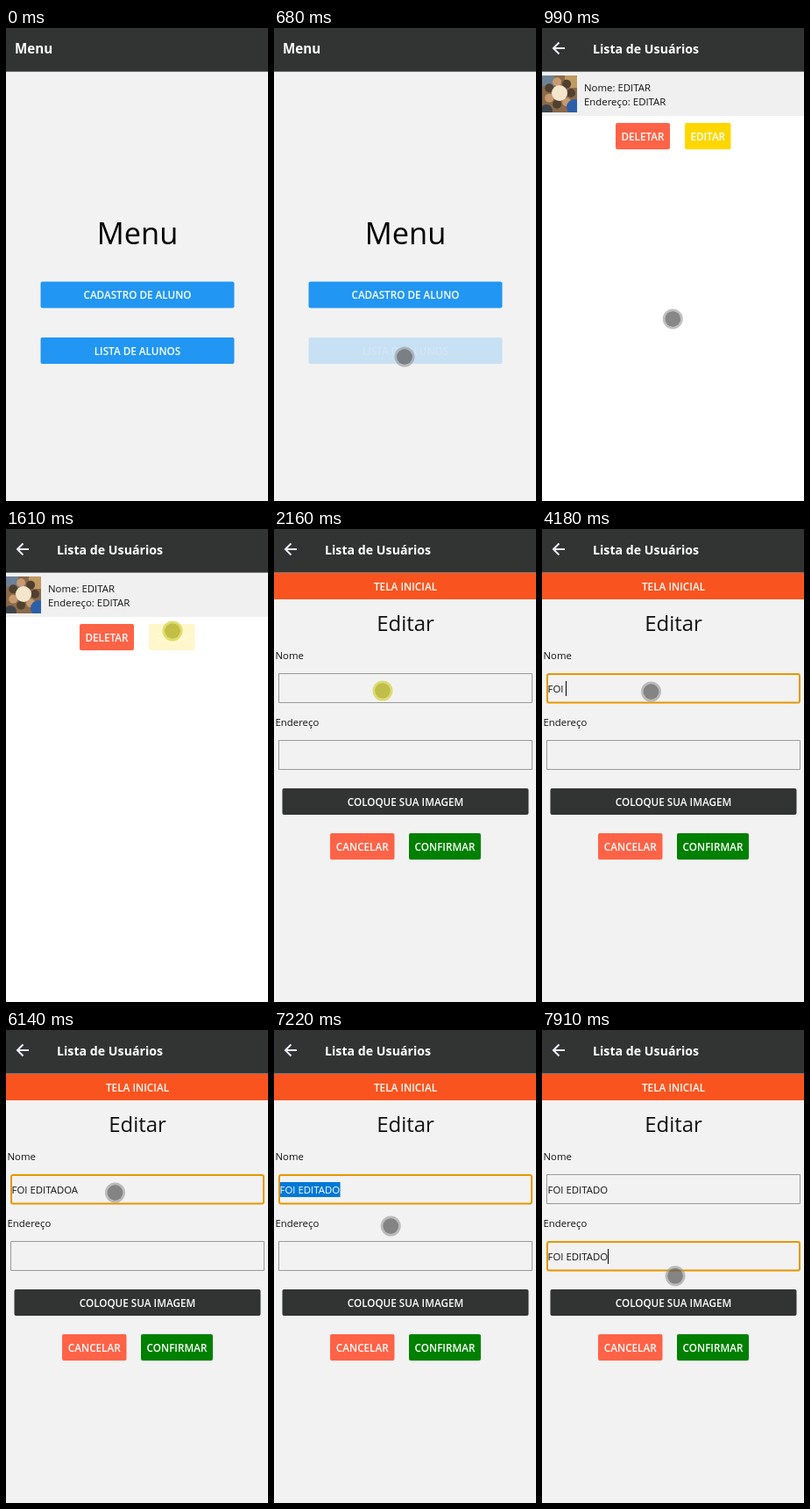
Animation of 299x538 px, one loop 7990 ms. Source, as an HTML page with a canvas:

```html
<!DOCTYPE html>
<html lang="pt">
<head>
<meta charset="utf-8">
<style>
html, body { margin: 0; width: 299px; height: 538px; overflow: hidden; }
canvas { display: block; }
</style>
</head>
<body>
<canvas id="stage" width="299" height="538"></canvas>
<script>
const LOOP = 7990;
const ctx = document.getElementById('stage').getContext('2d');
const TOMATO = '#ff6347', DARK = '#323333', PAGE = '#f2f2f2';

// Pointer path: time, x, y
const path = [
  [70, 271, 526], [450, 149, 374], [910, 149, 374], [1215, 150, 201], [1440, 190, 116],
  [1764, 190, 116], [2068, 124, 184], [2144, 124, 184], [2220, 124.5, 185],
  [6994, 124.5, 185], [7298, 142, 261], [7684, 142, 261], [7910, 157, 289]
];
const bursts = [70, 910, 1840, 7070, 7760];
const STEP = 76;
const presses = [[525, 675], [1518, 1690], [2068, 2390], [7298, 7530]];

const typed = 'FOI EDITADOA';
const keyTimes = [3630, 3950, 4100, 4180, 4410, 4560, 4960, 5130, 5280, 5360, 5430, 5660];

const within = (t, from, to) => t >= from && t < to;

function rect(x, y, w, h, color, radius = 0) {
  ctx.fillStyle = color;
  ctx.beginPath();
  ctx.roundRect(x, y, w, h, radius);
  ctx.fill();
}

function disc(x, y, r, color) {
  ctx.fillStyle = color;
  ctx.beginPath();
  ctx.arc(x, y, r, 0, 7);
  ctx.fill();
}

function text(str, x, y, size = 11.4, { weight = 400, color = '#111', align = 'left' } = {}) {
  ctx.font = `${weight} ${size}px "Open Sans", sans-serif`;
  ctx.textAlign = align;
  ctx.fillStyle = color;
  ctx.fillText(str, x, y);
}

function button(label, x, y, w, color, opacity = 1, radius = 2) {
  ctx.globalAlpha = opacity;
  rect(x, y, w, 30, color, radius);
  text(label, x + w / 2, y + 19.5, 11.7, { weight: 600, color: '#fff', align: 'center' });
  ctx.globalAlpha = 1;
}

function header(title, hasBack) {
  rect(0, 0, 299, 49, DARK);
  rect(0, 49, 299, 1, '#777');
  text(title, hasBack ? 58 : 10, 29, hasBack ? 14.2 : 15.2, { weight: 700, color: '#fff' });
  if (!hasBack) return;
  ctx.strokeStyle = '#eeeef8';
  ctx.lineWidth = 2;
  ctx.stroke(new Path2D('M26 23H13.5M19.5 16.5L13 23L19.5 29.5'));
}

function menuScreen(t) {
  text('Menu', 150, 246, 34.4, { color: '#000', align: 'center' });
  button('CADASTRO DE ALUNO', 39.5, 288.5, 221, '#2196f3');
  const opacity = t < 525 ? 1 : t < 601 ? 0.6 : t < 750 ? 0.2 : t < 830 ? 0.45 : 0.8;
  button('LISTA DE ALUNOS', 39.5, 352, 221, '#2196f3', opacity);
}

function thumbnail() {
  ctx.save();
  ctx.beginPath();
  ctx.rect(0, 54, 40, 42);
  ctx.clip();
  rect(0, 54, 40, 42, '#8a6a4a');
  rect(0, 54, 14, 12, '#6d8296');
  rect(26, 54, 14, 14, '#bf9a62');
  for (let i = 0; i < 7; i++) {
    const a = i * Math.PI * 2 / 7;
    disc(20 + 13 * Math.cos(a), 74 + 13 * Math.sin(a), 5, i % 2 ? '#c79a70' : '#50402f');
  }
  disc(20, 74, 9, '#f3e6cd');
  disc(37, 90, 9, '#2c5fa8');
  disc(5, 94, 7, '#3d444c');
  ctx.restore();
}

function listScreen(t) {
  rect(0, 50, 299, 488, '#fff');
  rect(0, 50, 299, 50, '#f0f0f0');
  thumbnail();
  text('Nome: EDITAR', 48, 72);
  text('Endereço: EDITAR', 48, 88);
  button('DELETAR', 84, 108, 62, TOMATO);
  button('EDITAR', 163, 108, 52.5, '#ffd700', t < 1518 ? 1 : t < 1594 ? 0.6 : 0.2);
}

function field(y, value, { focused, caret, selected }) {
  ctx.strokeStyle = focused ? '#e59700' : '#999';
  ctx.lineWidth = focused ? 2 : 1;
  ctx.beginPath();
  if (focused) ctx.roundRect(6, y + 1, 288, 32.5, 2);
  else ctx.rect(5.5, y + 0.5, 289, 33);
  ctx.stroke();
  ctx.font = '11.4px "Open Sans", sans-serif';
  const width = ctx.measureText(value).width;
  if (selected) rect(7, y + 9, width, 17, '#0078d7');
  text(value, 6.5, y + 22, 11.4, { color: selected ? '#fff' : '#111' });
  if (caret) rect(Math.round(6.5 + width), y + 9, 1, 17, '#000');
}

function editScreen(t) {
  rect(0, 50, 299, 30, '#f9541f');
  text('TELA INICIAL', 150, 70, 11.8, { weight: 600, color: '#fff', align: 'center' });
  text('Editar', 150, 116, 24, { align: 'center' });
  text('Nome', 1.5, 148);
  text('Endereço', 1.5, 224);

  const count = t >= 6440 ? 11 : keyTimes.filter(k => k <= t).length;
  field(164, typed.slice(0, count), {
    focused: within(t, 2240, 7374),
    caret: within(t, 2240, 2790) || within(t, 3250, 6140),
    selected: within(t, 6670, 7374)
  });
  field(240, t >= 7760 ? typed.slice(0, 11) : '', { focused: t >= 7374, caret: t >= 7374 });

  button('COLOQUE SUA IMAGEM', 9.5, 295, 281, DARK);
  button('CANCELAR', 64, 346, 73.5, TOMATO);
  button('CONFIRMAR', 154, 346, 82, '#008000');
}

// The pointer advances in discrete steps within each burst of movement
function pointerAt(t) {
  const start = bursts.filter(b => b <= t).pop();
  const time = start + Math.floor((t - start) / STEP) * STEP;
  const next = path.findIndex(p => p[0] > time);
  if (next < 0) return path.at(-1).slice(1);
  const [t0, x0, y0] = path[next - 1], [t1, x1, y1] = path[next];
  const k = (time - t0) / (t1 - t0);
  return [x0 + (x1 - x0) * k, y0 + (y1 - y0) * k];
}

function pointer(t) {
  if (t < 70) return;
  const [x, y] = pointerAt(t);
  const pressed = presses.some(([from, to]) => within(t, from, to));
  ctx.strokeStyle = pressed ? 'rgba(215,215,80,.8)' : 'rgba(150,150,150,.6)';
  ctx.lineWidth = 2.5;
  ctx.beginPath();
  ctx.arc(x, y, 10.25, 0, 7);
  ctx.stroke();
  disc(x, y, 9, pressed ? 'rgba(185,180,45,.85)' : 'rgba(95,95,95,.75)');
}

function draw(t) {
  rect(0, 0, 299, 538, PAGE);
  if (t < 910) menuScreen(t);
  else if (t < 1690) listScreen(t);
  else editScreen(t);
  if (t < 840) header('Menu', false);
  else header('Lista de Usuários', true);
  pointer(t);
}

const begin = performance.now();
function tick() {
  draw((performance.now() - begin) % LOOP);
  requestAnimationFrame(tick);
}
tick();
</script>
</body>
</html>
```
